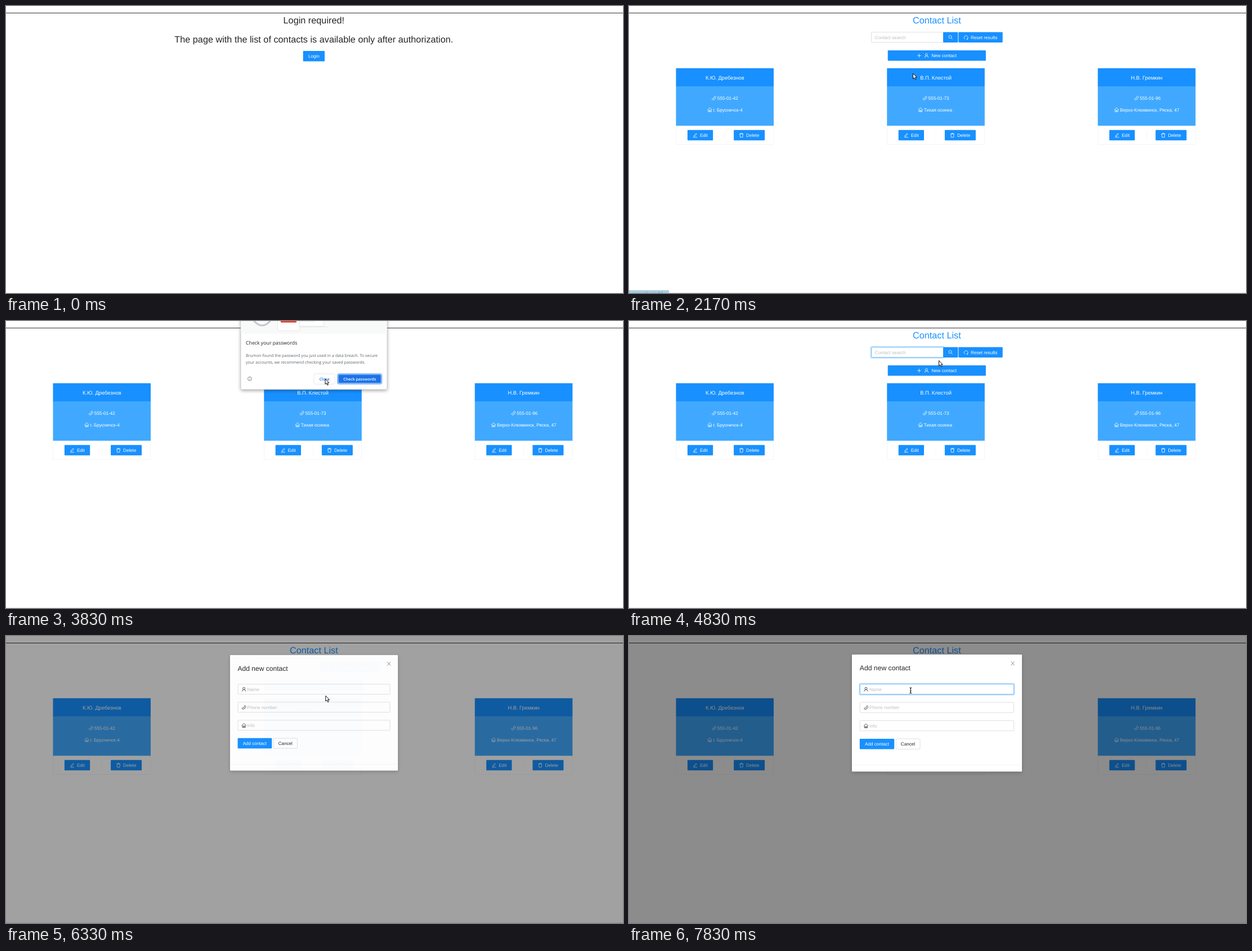
Animation of 1096x511 px, one loop 8000 ms. Source, as an HTML page:

```html
<!DOCTYPE html>
<html lang="en">
<head>
<meta charset="utf-8">
<title>Contact list</title>
<style>
html, body { margin: 0; height: 100%; overflow: hidden; background: #fff }
svg { display: block; width: 100vw; height: 100vh }
text { font: 8.13px "Liberation Sans", Arial, sans-serif; fill: #262626; text-rendering: geometricPrecision; white-space: pre }
.h { font-size: 16.25px }
.t { font-size: 12.2px }
.name { font-size: 9.29px }
.mid { text-anchor: middle }
.white { fill: #fff }
.blue { fill: #1890ff }
.hint { fill: #bfbfbf }
.pop { font: 7.19px "Open Sans", "Noto Sans", sans-serif; fill: #5f6368 }
.popTitle { font: 8.75px "Open Sans", "Noto Sans", sans-serif; fill: #202124 }
.popBtn { font: 600 7px "Open Sans", "Noto Sans", sans-serif; text-anchor: middle }
.btn { fill: #1890ff }
.btn.hot { fill: #379cf4 }
.box { fill: #fff; stroke: #d9d9d9; stroke-width: .8 }
.box.focus { stroke: #40a9ff }
.glow { fill: none; stroke: #1890ff; stroke-opacity: .2; stroke-width: 2.4 }
.icon { fill: none; stroke-width: 1.5; stroke-linejoin: round }
</style>
</head>
<body>
<script>
// Icons are drawn in a 16 by 16 box
const ICONS = {
  user: 'M8 1.2a3.8 3.8 0 1 1 0 7.6a3.8 3.8 0 1 1 0-7.6M1.8 15.3a6.2 6.2 0 0 1 12.4 0',
  lock: 'M2.5 7.5H13.5V15H2.5ZM5 7.5V4a3 3 0 0 1 6 0V7.5M8 10V12.5',
  phone: 'M11.5 1.2L14.8 4.5Q13.5 13.5 4.5 14.8L1.2 11.5L4.3 8.6L6.7 9.8Q9 8.8 9.8 6.7L8.6 4.3Z',
  home: 'M.5 8.5L8 1.2L15.5 8.5M2.8 7.5V14.8H13.2V7.5M6.3 14.8V10H9.7V14.8',
  edit: 'M1 15H15M3.5 12L4.2 8.8L11 2L13.5 4.5L6.7 11.3Z',
  trash: 'M1.2 4H14.8M5.3 4V1.3H10.7V4M3 4L3.7 15H12.3L13 4',
  search: 'M6.8 1.6a5 5 0 1 1 0 10a5 5 0 1 1 0-10M10.5 10.5L15 15',
  reload: 'M4.4 14A6.6 6.6 0 1 1 11.6 14M11.2 11V14.4H14.6',
  plus: 'M8 1.5V14.5M1.5 8H14.5',
  close: 'M2.5 1.5L13.5 14.5M13.5 1.5L2.5 14.5',
  info: 'M8 1a7 7 0 1 1 0 14a7 7 0 1 1 0-14M8 7V12M8 4V5.6'
};

const rect = (x, y, w, h, attrs) => `<rect x="${x}" y="${y}" width="${w}" height="${h}" ${attrs}/>`;
const text = (x, y, str, cls = '') => `<text x="${x}" y="${y}" class="${cls}">${str}</text>`;
const icon = (name, cx, cy, color = '#fff', k = .52) =>
  `<path class="icon" d="${ICONS[name]}" stroke="${color}" transform="translate(${cx - 8 * k} ${cy - 8 * k}) scale(${k})"/>`;
const group = (id, ...parts) => `<g id="${id}">${parts.join('')}</g>`;
const button = (x, y, w, id = '') => rect(x, y, w, 18.5, `rx="1.1" class="btn" id="${id}"`);
const box = (x, y, w, cls = '') => rect(x, y, w, 18.2, `rx="1.1" class="box ${cls}"`);
const glow = (x, y, w) => rect(x - 1, y - 1, w + 2, 20.2, 'rx="1.8" class="glow"');

const card = (x, name, phone, phoneX, place, placeX) => [
  rect(x + .3, 111, 173, 135.5, 'fill="#fff" stroke="#f0f0f0" stroke-width=".7"'),
  rect(x, 110.8, 173.5, 33, 'fill="#1890ff"'),
  rect(x, 143.5, 173.5, 69.7, 'fill="#40a9ff"'),
  text(x + 86.8, 130.7, name, 'name white mid'),
  icon('phone', phoneX - 6, 163.8), text(phoneX, 166.8, phone, 'white'),
  icon('home', placeX - 6, 184.6), text(placeX, 187.7, place, 'white'),
  rect(x + 86.4, 222, .6, 16, 'fill="#f0f0f0"'),
  button(x + 20.4, 220.8, 45.3), icon('edit', x + 34, 230), text(x + 42.4, 232.9, 'Edit', 'white'),
  button(x + 102.6, 220.8, 55), icon('trash', x + 116.2, 230), text(x + 124.6, 232.9, 'Delete', 'white')
].join('');

const field = (y, name, label, cls) => [
  box(410.3, y, 273.3, cls), icon(name, 421, y + 9.3, '#262626'), text(427, y + 12.2, label, 'hint')
].join('');

const welcome = group('welcome',
  text(546.8, 30.8, 'Login required!', 'h mid'),
  text(546.8, 64.6, 'The page with the list of contacts is available only after authorization.', 'h mid'),
  button(527.7, 80, 38.4, 'enter'), text(546.9, 92.4, 'Login', 'white mid'));

const auth = group('auth',
  text(546.8, 30.8, 'User authorization', 'h mid'),
  box(482.5, 46.6, 129), rect(499, 49.8, 107, 12, 'fill="#f6f7fa"'),
  icon('user', 493.4, 55.8, '#262626'), text(499.4, 58.9, 'vera@mbox.test'),
  box(482.5, 79.2, 129), rect(499, 82.3, 107, 12, 'fill="#f6f7fa"'),
  icon('lock', 493.4, 88, '#262626'), text(499.6, 91.2, '••••••'),
  button(482.2, 111.5, 38.4, 'submit'), text(501.3, 123.9, 'Login', 'white mid'),
  text(522.9, 123.9, 'or'), text(532.3, 123.9, 'sign up!', 'blue'));

const list = group('list',
  rect(0, 510, 1096, 1, 'fill="#ececec"'),
  text(546.8, 30.8, 'Contact List', 'h blue mid'),
  box(430.5, 46.6, 128),
  group('searchFocus', glow(430.5, 46.6, 128), box(430.5, 46.6, 128, 'focus')),
  text(436.8, 58.9, 'Contact search', 'hint'),
  button(558, 46.4, 26.4), icon('search', 571.2, 55.7),
  button(585.3, 46.4, 78.4, 'reset'), icon('reload', 598.7, 56), text(606.9, 58.9, 'Reset results', 'white'),
  button(459.7, 79, 174.2, 'create'), icon('plus', 515.4, 88.3), icon('user', 528.4, 88.2),
  text(537.2, 91.4, 'New contact', 'white'),
  card(83.5, 'К.Ю. Дребезнов', '555-01-42', 156.8, 'г. Брусничск-4', 149.5),
  card(458.3, 'В.П. Клестой', '555-01-73', 531.6, 'Тихая осинка', 523.8),
  card(832.8, 'Н.В. Гремкин', '555-01-96', 907.2, 'Верхо-Клюквинск, Ряска, 47', 872));

const popup = group('popup',
  rect(417, -20, 260, 142, 'rx="2" fill="#fff" filter="url(#soft)"'),
  rect(417, -20, 260, 142, 'rx="2" fill="#fff" stroke="#bbb" stroke-width=".6"'),
  rect(417.3, -20, 259.4, 43, 'fill="#f8f9f9"'),
  '<path d="M439 -2Q455 18 471 -2" fill="none" stroke="#c4c7cc" stroke-width="3"/>',
  rect(521.5, -10, 43, 19, 'fill="#fff" stroke="#dfe1e5" stroke-width=".8"'),
  rect(521.5, 10.2, 51.5, .8, 'fill="#dfe1e5"'), rect(522, 0, 26, .8, 'fill="#dfe1e5"'),
  rect(482.5, -10, 39, 27.5, 'rx="2" fill="#fff" stroke="#dfe1e5" stroke-width=".8"'),
  rect(488, -6, 28, 8.8, 'rx="1" fill="#ea4335"'),
  text(426, 42.2, 'Check your passwords', 'popTitle'),
  text(426, 64, 'Brumon found the password you just used in a data breach. To secure', 'pop'),
  text(426, 76, 'your accounts, we recommend checking your saved passwords.', 'pop'),
  icon('info', 433, 102.9, '#5f6368', .5),
  rect(547, 94, 37.3, 18.3, 'rx="2.2" fill="#fff" stroke="#dadce0" stroke-width=".7"'),
  '<text x="565.7" y="105.6" class="popBtn" style="fill:#1a73e8">Close</text>',
  rect(589, 94.2, 78.4, 17.8, 'rx="2.2" fill="#fff" stroke="#1a73e8" stroke-width="1"'),
  rect(590.4, 95.6, 75.6, 15, 'rx="1.4" fill="#1a73e8"'),
  text(628.3, 105.6, 'Check passwords', 'popBtn white'));

const modal = group('modal',
  rect(396, 33, 302, 208.5, 'rx="1.2" filter="url(#soft)" opacity=".6"'),
  rect(396, 33, 302, 208.5, 'rx="1.2" fill="#fff"'),
  text(409.8, 61.2, 'Add new contact', 't'),
  icon('close', 681.7, 48.8, '#777', .55),
  field(85.6, 'user', 'Name'),
  group('nameFocus', glow(410.3, 85.6, 273.3), field(85.6, 'user', 'Name', 'focus')),
  field(118.1, 'phone', 'Phone number'),
  field(150.6, 'home', 'Info'),
  button(409.8, 182.9, 61.4), text(440.5, 195.2, 'Add contact', 'white mid'),
  box(474.2, 183.1, 42.8), text(495.5, 195.2, 'Cancel', 'mid'),
  rect(396, 229.5, 302, .7, 'fill="#f0f0f0"'),
  rect(427.1, 90, .8, 10, 'id="caret" fill="#262626"'));

const overlay = [
  rect(0, 0, 1096, 511, 'id="mask"'),
  modal,
  group('bubble', rect(0, 506, 71, 6, 'fill="#a9cfdb"'), text(7, 515.3, 'page / login 04', 'blue')),
  popup,
  `<g id="pointer">
    <path id="arrow" d="M0 0V9.5L2.2 7.6L3.8 11.2L5.5 10.4L3.9 7H6.8Z" fill="#fff" stroke="#111" stroke-width="1"/>
    <path id="beam" d="M-2 -5Q0 -5 0 -3.8V3.8Q0 5 -2 5M2 -5Q0 -5 0 -3.8M0 3.8Q0 5 2 5M-1.2 .8H1.2" fill="none" stroke="#111" stroke-width="1.1"/>
  </g>`
].join('');

document.body.innerHTML = `<svg viewBox="0 0 1096 511" preserveAspectRatio="none">
  <filter id="soft" x="-10%" y="-10%" width="120%" height="125%">
    <feDropShadow dx="0" dy="2" stdDeviation="3" flood-opacity=".35"/></filter>
  ${rect(0, 12, 1096, 1, 'fill="#333"')}${welcome}${auth}${list}${overlay}</svg>`;

const $ = id => document.getElementById(id);
const show = (id, on) => $(id).setAttribute('visibility', on ? 'inherit' : 'hidden');
const hot = (id, on) => $(id).classList.toggle('hot', on);

// Pointer path: step, x, y
const PATH = [
  [1, 575, 190], [4, 548, 102], [5, 543, 98.5], [6, 543, 98.5], [11, 508, 122], [12, 503, 120],
  [14, 506, 120], [18, 590, 89.5], [20, 597, 97], [23, 567, 103], [24, 565, 102], [27, 520, 57],
  [29, 550.5, 70.5], [31, 605, 58], [32, 612, 56], [34, 592, 175], [36, 570, 101],
  [37, 568.7, 96.5], [38, 567.8, 106.5], [40, 530, 99], [43, 501, 97], [44, 500.3, 97]
];

function pointerAt(n) {
  const i = PATH.findIndex(p => p[0] >= n);
  if (i < 0) return PATH[PATH.length - 1].slice(1);
  const b = PATH[i], a = PATH[i - 1] || b;
  const k = b === a ? 1 : (n - a[0]) / (b[0] - a[0]);
  return [a[1] + (b[1] - a[1]) * k, a[2] + (b[2] - a[2]) * k];
}

function draw(n) {
  const within = (from, to) => n >= from && n < to;
  show('welcome', n < 6);
  show('auth', within(6, 13));
  show('list', n >= 13);
  show('popup', within(16, 24));
  show('searchFocus', within(27, 33));
  show('mask', n >= 38);
  show('modal', n >= 38);
  show('nameFocus', n >= 44);
  show('caret', within(44, 47));
  show('bubble', within(4, 8) || within(13, 16));
  hot('enter', within(4, 6));
  hot('submit', within(11, 13));
  hot('reset', within(31, 33));
  hot('create', within(36, 38));

  const opening = n === 38;
  $('mask').setAttribute('opacity', opening ? .37 : .45);
  $('modal').setAttribute('opacity', opening ? .98 : 1);
  $('modal').setAttribute('transform', opening ? 'translate(555 97) scale(.988) translate(-555 -97)' : '');

  const beam = within(26, 29) || n >= 40;
  show('pointer', n > 0);
  show('beam', n > 0 && beam);
  show('arrow', n > 0 && !beam);
  $('pointer').setAttribute('transform', `translate(${pointerAt(n)})`);
}

const start = performance.now();
function tick() {
  const t = (performance.now() - start) % 8000;
  draw(Math.floor((t + 5) * .006) % 48);
  requestAnimationFrame(tick);
}
tick();
</script>
</body>
</html>
```
